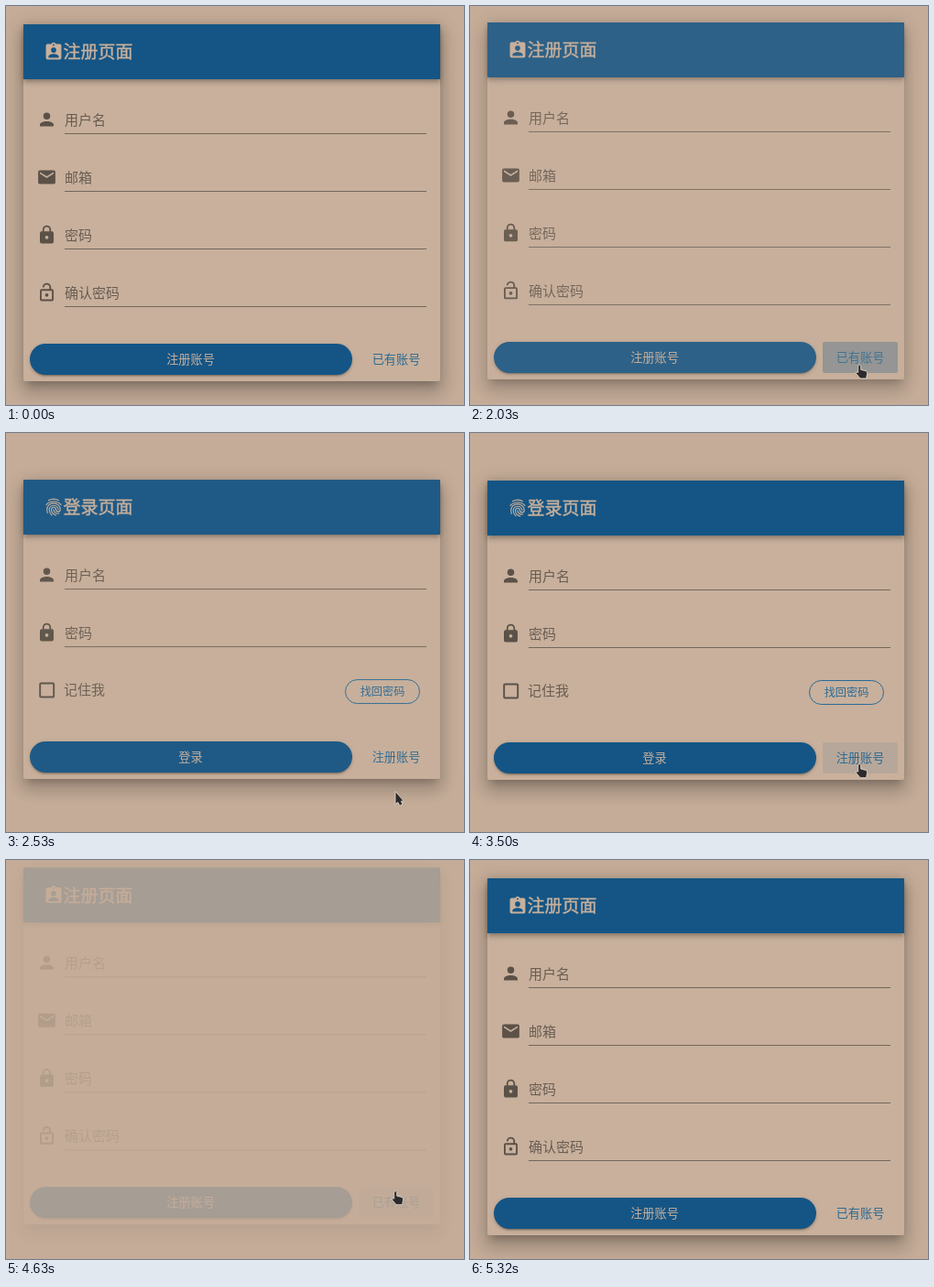
An HTML page that plays this animation: 500x436 px, repeating every 6400 ms.

```html
<!DOCTYPE html>
<html lang="zh-CN">
<head>
<meta charset="utf-8">
<title>注册与登录</title>
<style>
  html, body { margin: 0; width: 100%; height: 100%; overflow: hidden; background: #c4ac98; }
  #stage { position: absolute; inset: 0; overflow: hidden; contain: strict; }
  .page, svg { position: absolute; left: 0; top: 0; width: 500px; height: 436px; }
  .card, .bar, .main { position: absolute; }
  .card {
    left: 18.5px; width: 455.5px; background: #c8b09c; border-radius: 2px;
    box-shadow: 0 7px 8px -4px rgba(0,0,0,.2), 0 12px 17px 2px rgba(0,0,0,.14), 0 5px 22px 4px rgba(0,0,0,.12);
  }
  .bar {
    left: 18.5px; top: 0; width: 455.5px; height: 59.5px; background: #145585;
    box-shadow: 0 2px 4px -1px rgba(0,0,0,.2), 0 4px 5px rgba(0,0,0,.14), 0 1px 10px rgba(0,0,0,.12);
  }
  .main {
    left: 26px; width: 351.5px; height: 34px; border-radius: 17px; background: #145585;
    box-shadow: 0 3px 1px -2px rgba(0,0,0,.2), 0 2px 2px rgba(0,0,0,.14), 0 1px 5px rgba(0,0,0,.12);
  }
  text { font-family: "Noto Sans CJK SC", "Noto Sans CJK", "Noto Sans", sans-serif; }
  .title { stroke: #c8b09c; stroke-width: .4px; }
</style>
</head>
<body>
<div id="stage"></div>
<script>
const LOOP = 6400, FADE = 300, RISE = 14;
const BLUE = '#145585', LINK = '#2a6a94', PAPER = '#c8b09c';
const INK = 'rgba(0,0,0,.54)', SOFT = 'rgba(0,0,0,.48)';
const stage = document.getElementById('stage');

const ICONS = {
  user: 'M12 4A4 4 0 0 1 12 12A4 4 0 0 1 12 4M12 14C16.4 14 20 15.8 20 18V20H4V18C4 15.8 7.6 14 12 14Z',
  mail: 'M20 8L12 13L4 8V6L12 11L20 6ZM20 4H4A2 2 0 0 0 2 6V18A2 2 0 0 0 4 20H20A2 2 0 0 0 22 18V6A2 2 0 0 0 20 4Z',
  lock: 'M12 17A2 2 0 0 0 12 13A2 2 0 0 0 12 17M18 8A2 2 0 0 1 20 10V20A2 2 0 0 1 18 22H6A2 2 0 0 1 4 20V10A2 2 0 0 1 6 8H7V6A5 5 0 0 1 17 6V8ZM12 2.9A3.1 3.1 0 0 0 8.9 6V8H15.1V6A3.1 3.1 0 0 0 12 2.9Z',
  open: 'M18 20V10H6V20ZM18 8A2 2 0 0 1 20 10V20A2 2 0 0 1 18 22H6A2 2 0 0 1 4 20V10A2 2 0 0 1 6 8H15V6A3 3 0 0 0 9 6H7A5 5 0 0 1 17 6V8ZM12 17A2 2 0 0 1 12 13A2 2 0 0 1 12 17Z',
  badge: 'M19 3H14.8A3 3 0 0 0 9.2 3H5A2 2 0 0 0 3 5V19A2 2 0 0 0 5 21H19A2 2 0 0 0 21 19V5A2 2 0 0 0 19 3ZM12 3A1 1 0 0 1 12 5A1 1 0 0 1 12 3M12 7A3 3 0 0 1 12 13A3 3 0 0 1 12 7M18 19H6V17.6C6 15.6 10 14.5 12 14.5S18 15.6 18 17.6Z',
  finger: 'M17.8 4C13.9 2 9.9 2 6.2 4M3.5 9.2C7.2 4 16.8 4 20.5 9.2M9.75 21.3C8 19.5 6.85 17.8 6.85 14.66A5.16 4.89 0 0 1 17.15 14.66M11.95 14.66c0 3.3 2.8 5.2 6.2 4.6M14.9 21.5c-3.3-.9-5.5-3.4-5.5-6.84a2.58 2.44 0 0 1 5.16 0a2.58 2.44 0 0 0 5.16 0c0-4-3.5-7.33-7.75-7.33c-4.7 0-7.7 3.2-7.7 7.6q0 1.9.7 3.7'
};

const icon = (name, x, y, color) => {
  const paint = name === 'finger'
    ? `fill="none" stroke="${color}" stroke-width="1.2" stroke-linecap="round"`
    : `fill="${color}" fill-rule="evenodd"`;
  return `<path transform="translate(${x - 11.25} ${y - 11.25}) scale(.9375)" d="${ICONS[name]}" ${paint}/>`;
};

// y is the vertical centre of the glyphs
const label = (str, x, y, size, color, more = '') =>
  `<text x="${x}" y="${y + size * .38}" font-size="${size}" fill="${color}" ${more}>${str}</text>`;

const LIGHT = 'font-weight="300"', MIDDLE = 'text-anchor="middle"';

const field = (name, str, i) => {
  const y = 104 + 63 * i;
  return icon(name, 44.5, y, INK) + label(str, 64, y, 15, SOFT, LIGHT) +
    `<rect x="64" y="${y + 15}" width="395" height="1" fill="rgba(0,0,0,.42)"/>`;
};

const remember =
  `<rect x="37.2" y="222.5" width="15" height="15" rx="1" fill="none" stroke="${INK}" stroke-width="1.9"/>` +
  label('记住我', 63, 229.5, 15, SOFT, LIGHT) +
  `<rect x="370.5" y="218.5" width="81" height="26" rx="13" fill="none" stroke="${LINK}"/>` +
  label('找回密码', 411, 231.5, 12.2, LINK, MIDDLE);

function makePage({ id, top, height, mark, title, body, action, link }) {
  const y = height - 41;
  const el = document.createElement('div');
  el.className = 'page';
  el.innerHTML = `
    <div class="card" style="top:0;height:${height}px"></div>
    <div class="bar"></div>
    <div class="main" style="top:${y}px"></div>
    <svg viewBox="0 0 500 436">
      <clipPath id="${id}"><rect x="385" y="${y}" width="82" height="34" rx="2"/></clipPath>
      ${icon(mark, 52, 30, PAPER)}
      ${label(title, 62.6, 30, 19, PAPER, 'class="title" font-weight="500"')}
      ${body}
      ${label(action, 201.5, y + 17, 13.2, PAPER, MIDDLE)}
      <g clip-path="url(#${id})" fill="${BLUE}">
        <rect class="hover" x="385" y="${y}" width="82" height="34"/>
        <circle class="ripple" cx="425"/>
      </g>
      ${label(link, 426, y + 17, 13.2, LINK, MIDDLE)}
    </svg>`;
  stage.append(el);
  return { el, top, hover: el.querySelector('.hover'), ripple: el.querySelector('.ripple') };
}

const signUp = makePage({
  id: 'linkA', top: 20, height: 390, mark: 'badge', title: '注册页面',
  body: field('user', '用户名', 0) + field('mail', '邮箱', 1) + field('lock', '密码', 2) + field('open', '确认密码', 3),
  action: '注册账号', link: '已有账号'
});
const signIn = makePage({
  id: 'linkB', top: 52, height: 327, mark: 'finger', title: '登录页面',
  body: field('user', '用户名', 0) + field('lock', '密码', 1) + remember,
  action: '登录', link: '注册账号'
});

stage.insertAdjacentHTML('beforeend', `
  <svg viewBox="0 0 500 436"><g id="pointer" stroke="#e2d3c6" stroke-width=".9" stroke-linejoin="round" fill="#2b2a2d">
    <path id="arrow" d="M0 0V14L2.9 11.8L4.7 15.6L7.8 14.3L6.4 10.6H9.4Z"/>
    <path id="hand" d="M-1.3 1.2Q.2-.8 1.7 1.2V5.6L7 6.9Q8.8 7.4 8.7 9.4L7.6 15.2H1L-3.7 9.6Q-4 7.4-1.3 8.6Z"/>
  </g></svg>`);
const [pointer, arrow, hand] = ['pointer', 'arrow', 'hand'].map(id => document.getElementById(id));

const clamp = v => Math.min(1, Math.max(0, v));
const ramp = (t, start, length) => clamp((t - start) / length);

// CSS "ease" curve
function ease(x) {
  if (x >= 1) return 1;
  let lo = 0, hi = 1;
  for (let i = 0; i < 24; i++) {
    const u = (lo + hi) / 2;
    if (.75 * u * (1 - u) + u ** 3 < x) lo = u; else hi = u;
  }
  const v = 1 - lo;
  return .3 * lo * v * v + 3 * lo * lo * v + lo ** 3;
}

// time, x, y
const TRACK = [
  [900, 432, 437], [1080, 428, 402], [1190, 419, 382], [1340, 425, 392],
  [3110, 425, 391.5], [3500, 425, 361.5], [4800, 425, 361.5],
  [5100, 397, 394], [5260, 335, 427], [5320, 331, 438]
];

function pointerAt(t) {
  const i = TRACK.findIndex(p => p[0] > t);
  if (i < 1) return null;
  const [a, b] = [TRACK[i - 1], TRACK[i]];
  const k = (t - a[0]) / (b[0] - a[0]);
  return [a[1] + (b[1] - a[1]) * k, a[2] + (b[2] - a[2]) * k];
}

function show(page, alpha, hover, ripple, rippleY) {
  page.el.style.opacity = alpha;
  page.el.style.transform = `translateY(${page.top - RISE * (1 - alpha)}px)`;
  page.hover.setAttribute('opacity', .09 * hover);
  page.ripple.setAttribute('cy', rippleY - page.top);
  page.ripple.setAttribute('r', 10 + 50 * ease(ripple));
  page.ripple.setAttribute('opacity', .26 * clamp(ripple * 3));
}

function draw() {
  const t = performance.now() % LOOP;
  const fade = start => ease(ramp(t, start, FADE));
  const back = t > 4560;

  show(signUp,
    back ? fade(4589) : 1 - fade(1992),
    back ? 1 - ramp(t, 5080, 200) : ramp(t, 1170, 200),
    back ? 0 : ramp(t, 1700, 300), 392);
  show(signIn,
    t < 4237 ? fade(2326) : 1 - fade(4237),
    ramp(t, 3330, 160),
    ramp(t, 3890, 300), 361.5);

  const at = pointerAt(t);
  pointer.style.display = at ? '' : 'none';
  if (at) {
    pointer.setAttribute('transform', `translate(${at[0]} ${at[1]})`);
    const over = (t > 1110 && t < 2326) || (t > 3360 && t < 5110);
    hand.style.display = over ? '' : 'none';
    arrow.style.display = over ? 'none' : '';
  }
  requestAnimationFrame(draw);
}
draw();
</script>
</body>
</html>
```
